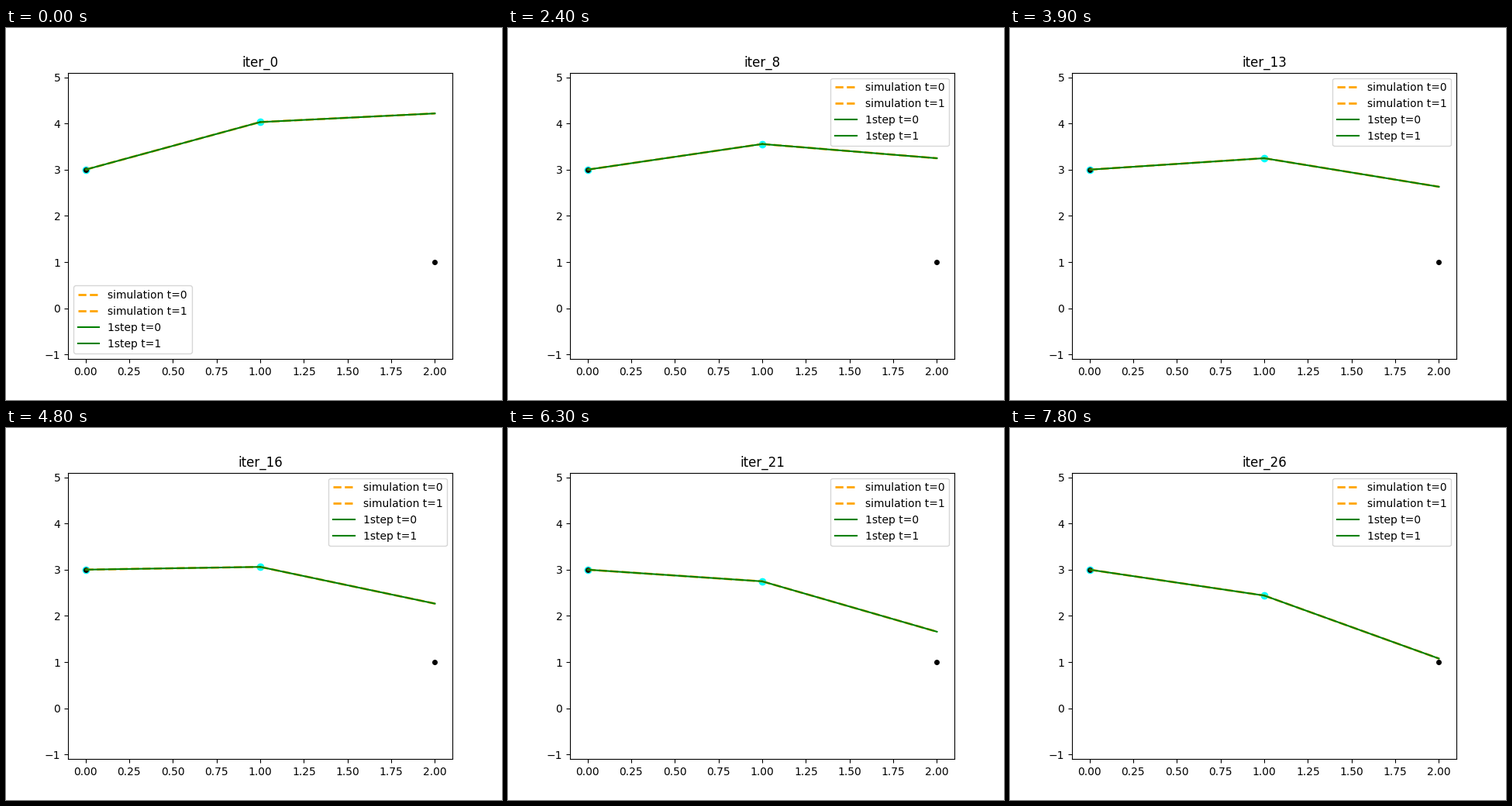
These frames come from a looping animation (640 px wide and 480 px high, 8000 ms). A matplotlib script:

```python
import numpy as np
import matplotlib.pyplot as plt
from matplotlib.animation import FuncAnimation

INTERVAL = 100          # ms per tick
TICKS_PER_ITER = 3      # the solver advances every 300 ms
N_TICKS = 80

# Trajectory heights at a few solver iterations
KEY_ITERS = [0, 4, 8, 13, 16, 21, 26]
MID_Y = [4.03, 3.795, 3.555, 3.248, 3.06, 2.747, 2.44]
END_Y = [4.217, 3.735, 3.247, 2.63, 2.265, 1.657, 1.076]

START, GOAL = (0, 3), (2, 1)

fig, ax = plt.subplots(figsize=(6.4, 4.8), dpi=100)
ax.set_xlim(-0.1, 2.1)
ax.set_ylim(-1.1, 5.1)
title = ax.set_title("iter_0")

nodes, = ax.plot([], [], "o", color="cyan", markersize=6)
ax.plot(*zip(START, GOAL), "o", color="black", markersize=4)


def make_lines(name, **style):
    return [ax.plot([], [], label=f"{name} t={t}", **style)[0] for t in range(2)]


simulated = make_lines("simulation", color="orange", linestyle="--", linewidth=2)
one_step = make_lines("1step", color="green", linewidth=1.5)


def legend_place(iteration):
    """Corner that the trajectory leaves free."""
    if iteration < 4:
        return "lower left"
    return "upper left" if iteration < 8 else "upper right"


def update(tick):
    iteration = tick // TICKS_PER_ITER
    y = [START[1],
         np.interp(iteration, KEY_ITERS, MID_Y),
         np.interp(iteration, KEY_ITERS, END_Y)]
    title.set_text(f"iter_{iteration}")
    nodes.set_data([0, 1], y[:2])
    for lines in (simulated, one_step):
        for t, line in enumerate(lines):
            line.set_data([t, t + 1], y[t:t + 2])
    legend = ax.legend(handles=simulated + one_step, loc=legend_place(iteration))
    return [title, nodes, *simulated, *one_step, legend]


anim = FuncAnimation(fig, update, frames=N_TICKS, init_func=lambda: update(0),
                     interval=INTERVAL, repeat=True, repeat_delay=0, blit=False)
plt.show()
```
